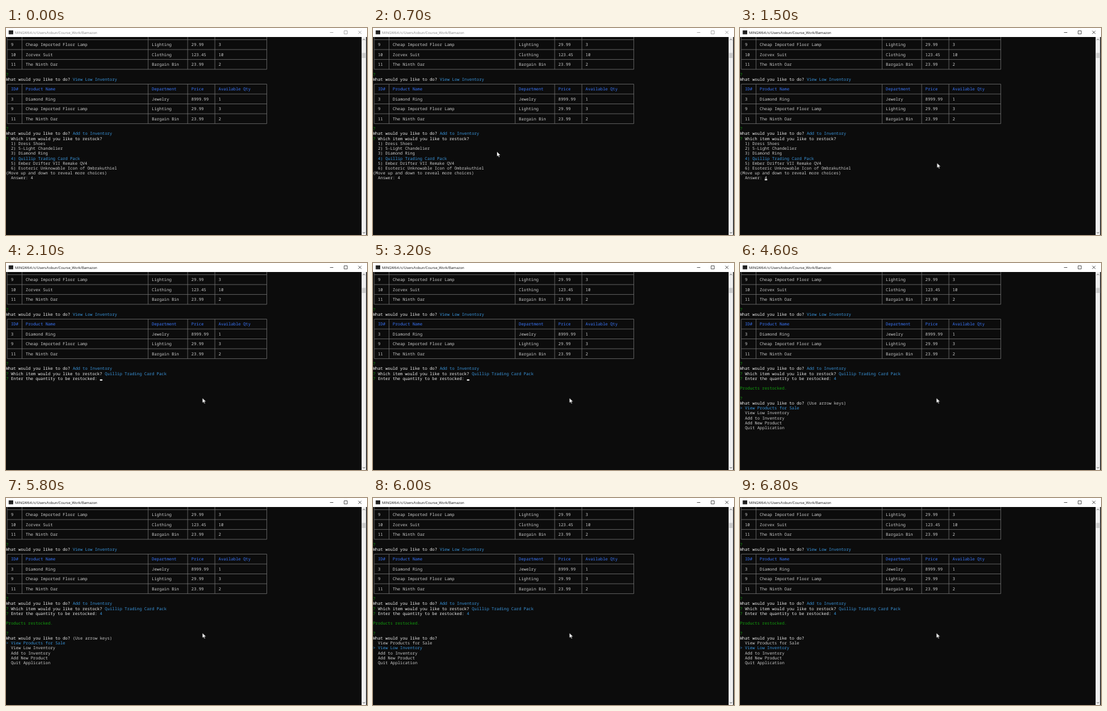
An HTML page for the animation above (7 s loop, 600 by 345 pixels).

```html
<!DOCTYPE html>
<html lang="en">
<head>
<meta charset="utf-8">
<title>Inventory console</title>
<style>
  html, body { margin: 0; width: 100%; height: 100%; overflow: hidden; background: #0c0c0c; }
  svg { display: block; width: 600px; height: 345px; }
  text { text-rendering: geometricPrecision; white-space: pre; }

  .console { font: 6.847px "Noto Sans Mono", "DejaVu Sans Mono", monospace; fill: #ccc; }
  .bright { fill: #f2f2f2; }
  .cyan { fill: #3a96dd; }
  .blue { fill: #3b78ff; }
  .green { fill: #13a10e; }
  .grid { fill: none; stroke: #747474; stroke-width: .8; }
  .caret { fill: #f2f2f2; }

  .bar { font: 5.86px "Open Sans", "Noto Sans", sans-serif; color: #858585; animation: focus 7s step-end infinite; }
  .bar text { fill: currentColor; }
  .bar path { fill: none; stroke: currentColor; stroke-width: .7; }

  /* Hard on/off switches; every element is hidden unless its keyframes show it. */
  .step { visibility: hidden; animation: 7s step-end infinite; }
  #choices { animation-name: choices; }
  #answerCaret { animation-name: answer-caret; }
  #quantity { animation-name: quantity; }
  #quantityCaret { animation-name: quantity-caret; }
  #typed { animation-name: typed; }
  #typedCaret { animation-name: typed-caret; }
  #restocked { animation-name: restocked; }
  #firstItem { animation-name: first-item; }
  #secondItem { animation-name: second-item; }
  #pointer { animation: travel 7s infinite; }

  @keyframes focus { 0% { color: #858585 } 17.1%, 100% { color: #111 } }
  @keyframes choices { 0% { visibility: visible } 28.5%, 100% { visibility: hidden } }
  @keyframes answer-caret {
    0%, 27.1%, 100% { visibility: hidden }
    17.1% { visibility: visible }
  }
  @keyframes quantity { 0% { visibility: hidden } 28.5%, 100% { visibility: visible } }
  @keyframes quantity-caret {
    0%, 34.2%, 41.4%, 48.5%, 55.7%, 100% { visibility: hidden }
    28.5%, 38.5%, 45.7%, 51.4% { visibility: visible }
  }
  @keyframes typed {
    0%, 62.8%, 100% { visibility: hidden }
    57.1% { visibility: visible }
  }
  @keyframes typed-caret {
    0%, 61.4%, 100% { visibility: hidden }
    57.1% { visibility: visible }
  }
  @keyframes restocked { 0% { visibility: hidden } 62.8%, 100% { visibility: visible } }
  @keyframes first-item {
    0%, 84.2%, 100% { visibility: hidden }
    62.8% { visibility: visible }
  }
  @keyframes second-item { 0% { visibility: hidden } 84.2%, 100% { visibility: visible } }
  @keyframes travel {
    0% { transform: translate(620px, 360px); animation-timing-function: step-end }
    1.4% { transform: translate(597px, 343px); animation-timing-function: ease-out }
    9.95%, 11.4% { transform: translate(206px, 206px); animation-timing-function: ease-in-out }
    17.1% { transform: translate(327.5px, 225px); animation-timing-function: step-end }
    28.5%, 100% { transform: translate(326.5px, 225px) }
  }
</style>
</head>
<body>
<svg viewBox="0 0 600 345">
  <rect width="600" height="345" fill="#0c0c0c"/>

  <g class="console">
    <g id="history"></g>
    <g id="choices" class="step"></g>
    <g id="quantity" class="step"></g>
    <g id="typed" class="step"></g>
    <g id="restocked" class="step"></g>
    <g id="firstItem" class="step"></g>
    <g id="secondItem" class="step"></g>
    <rect id="answerCaret" class="step caret" x="41.1" y="251.8" width="4.1" height="2"/>
    <rect id="quantityCaret" class="step caret" x="156.1" y="194" width="4.1" height="2"/>
    <rect id="typedCaret" class="step caret" x="160.2" y="194" width="4.1" height="2"/>
  </g>

  <g class="bar">
    <rect width="600" height="15" fill="#fff"/>
    <rect x="4.5" y="4" width="7.5" height="6.5" fill="#222"/>
    <text x="15" y="9.6">MINGW64:/c/Users/tobun/Course_Work/Bamazon</text>
    <path d="M538.5 7.5h5.5M562 4.7h5.2v5.2h-5.2zM585.5 4.7l5.2 5.2M590.7 4.7l-5.2 5.2"/>
  </g>

  <rect x="591" y="15" width="7.6" height="330" fill="#f0f0f0"/>
  <rect x="591.6" y="41.5" width="6.6" height="8.5" fill="#cdcdcd"/>
  <path d="M593 20.3l1.9-1.9 1.9 1.9M593 340.2l1.9 1.9 1.9-1.9" fill="none" stroke="#505050" stroke-width=".9"/>

  <path id="pointer" d="M0 0V8.2L1.9 6.5L3.2 9.4L4.5 8.8L3.2 6H5.8Z" fill="#fff" stroke="#000" stroke-width=".4"/>
</svg>

<script>
  const CELL = 4.108, LINE = 8.23, ORIGIN = 77.1;
  const NS = "http://www.w3.org/2000/svg";
  const layer = id => document.getElementById(id);
  const rowY = row => ORIGIN + row * LINE;

  function add(parent, tag, attrs) {
    const node = document.createElementNS(NS, tag);
    for (const key in attrs) node.setAttribute(key, attrs[key]);
    return parent.appendChild(node);
  }

  function put(id, row, col, text, tone = "") {
    add(layer(id), "text", { x: col * CELL, y: rowY(row) + 2.5, class: tone }).textContent = text;
  }

  const TEXT_COLS = [2, 8, 59, 75, 86];
  const RULE_COLS = [0, 6, 57, 73, 84, 105];

  function table(topRow, rows, hasHeader) {
    const xs = RULE_COLS.map(col => (col + .5) * CELL);
    const bottom = topRow + rows.length * 2;
    let d = "";
    for (let row = topRow; row <= bottom; row += 2) d += `M${xs[0]} ${rowY(row)}H${xs[5]}`;
    // A table without its header continues above the visible area.
    const top = hasHeader ? rowY(topRow) : 15;
    for (const x of xs) d += `M${x} ${top}V${rowY(bottom)}`;
    add(layer("history"), "path", { d, class: "grid" });
    rows.forEach((cells, i) => cells.forEach((cell, j) =>
      put("history", topRow + 1 + i * 2, TEXT_COLS[j], cell, hasHeader && !i ? "blue" : "")));
  }

  const lamp = ["9", "Cheap Imported Floor Lamp", "Lighting", "29.99", "3"];
  const film = ["11", "The Ninth Oar", "Bargain Bin", "23.99", "2"];
  const cards = "Quillip Trading Card Pack";
  const ask = "What would you like to do?";

  table(-7, [lamp, ["10", "Zorvex Suit", "Clothing", "123.45", "10"], film], false);
  table(2, [
    ["ID#", "Product Name", "Department", "Price", "Available Qty"],
    ["3", "Diamond Ring", "Jewelry", "8999.99", "1"],
    lamp, film
  ], true);

  for (const row of [0, 11, 13]) put("history", row, 0, "?", "green");
  put("history", 1, 0, ask, "bright");
  put("history", 1, 27, "View Low Inventory", "cyan");
  put("history", 12, 0, ask, "bright");
  put("history", 12, 27, "Add to Inventory", "cyan");
  put("history", 13, 2, "Which item would you like to restock?", "bright");

  ["Dress Shoes", "5-Light Chandelier", "Diamond Ring", cards,
   "Ember Drifter VII Remake QV4", "Esoteric Unknowable Icon of Ombrakuthiel"]
    .forEach((name, i) => put("choices", 14 + i, 2, `${i + 1}) ${name}`, i === 3 ? "cyan" : ""));
  put("choices", 20, 0, "(Move up and down to reveal more choices)");
  put("choices", 21, 2, "Answer: 4");

  put("quantity", 13, 40, cards, "cyan");
  put("quantity", 14, 0, "?", "green");
  put("quantity", 14, 2, "Enter the quantity to be restocked:", "bright");
  put("typed", 14, 38, "4");

  put("restocked", 14, 38, "4", "cyan");
  put("restocked", 16, 0, "Products restocked.", "green");
  put("restocked", 18, 0, "?", "green");
  put("restocked", 19, 0, ask, "bright");

  const menu = ["View Products for Sale", "View Low Inventory", "Add to Inventory",
                "Add New Product", "Quit Application"];
  function showMenu(id, selected) {
    menu.forEach((item, i) => put(id, 20 + i, 2, item, i === selected ? "cyan" : ""));
    put(id, 20 + selected, 0, ">", "cyan");
  }
  put("firstItem", 19, 27, "(Use arrow keys)");
  showMenu("firstItem", 0);
  showMenu("secondItem", 1);
</script>
</body>
</html>
```
